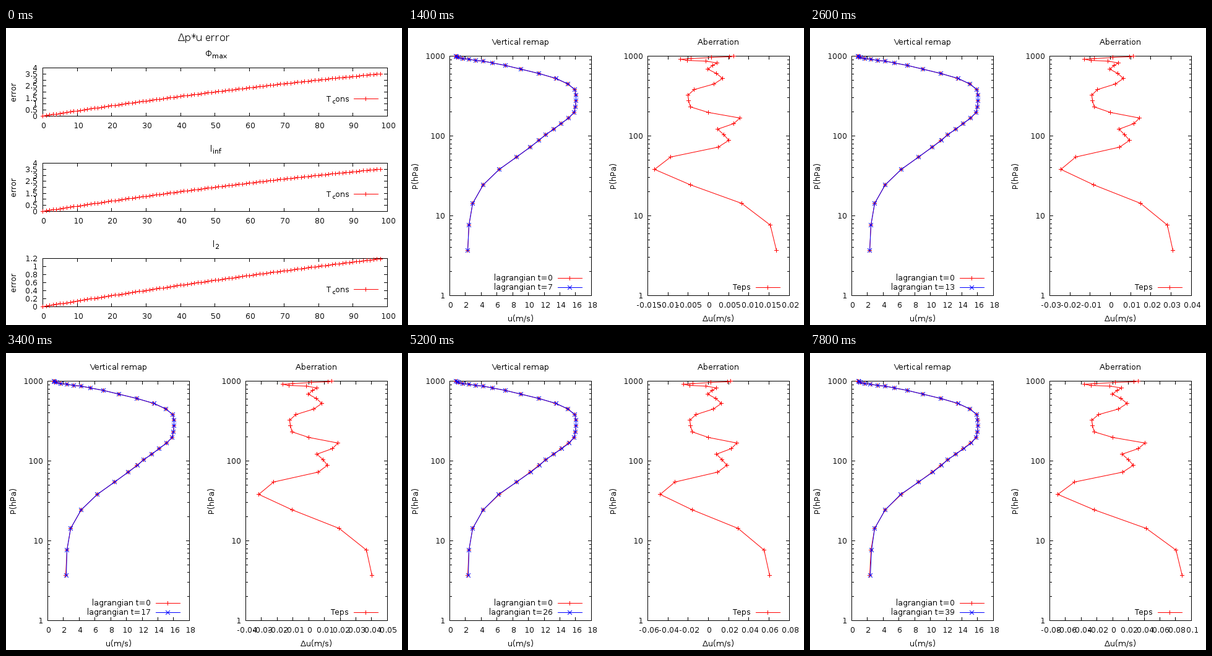
Write a matplotlib script that moves like this. It is 640 by 480 pixels and loops after 8000 ms.

```python
import math

import matplotlib.pyplot as plt
import numpy as np
from matplotlib.animation import FuncAnimation

W, H, DPI = 640, 480, 100
FRAMES, INTERVAL = 40, 200
LEVELS = np.arange(30)
RED, BLUE, BLACK = "#ff0000", "#0000ff", "#000000"
GAP = (np.nan, np.nan)

plt.rcParams.update({
    "font.family": "DejaVu Sans",
    "path.simplify": False,
    "text.hinting": "default",
    "text.hinting_factor": 1,
})


def smooth(x, *keys):
    """Cubic Hermite curve through (x, y) key points."""
    kx, ky = np.array(keys, float).T
    slope = np.gradient(ky, kx)
    i = np.clip(np.searchsorted(kx, x, "right") - 1, 0, len(kx) - 2)
    h = kx[i + 1] - kx[i]
    s = (x - kx[i]) / h
    ease = s * s * (3 - 2 * s)
    bend = s * (1 - s) * ((1 - s) * slope[i] - s * slope[i + 1])
    return ky[i] + (ky[i + 1] - ky[i]) * ease + h * bend


def level_pressure():
    """Log-spaced hybrid levels, summed upwards from the surface."""
    step = np.interp(LEVELS[:-1], [0, 3, 6, 7, 17, 18, 22, 23, 28],
                     [.735, .438, .1985, .1626, .1626, .1503, .046, .0315,
                      .0165])
    height = np.append(np.cumsum(step[::-1])[::-1], 0)
    return 992.6 * np.exp(-height)


PRESSURE = level_pressure()
WIND = smooth(LEVELS, (0, 2.28), (2, 2.9), (3, 4.23), (5, 8.5), (6, 10.25),
              (8, 12.2), (10, 14.17), (12, 15.8), (13, 15.98), (15, 16.02),
              (16, 15.9), (18, 13.48), (20, 9.04), (22, 5.45), (24, 3.33),
              (27, 1.1), (29, 0.8))
# Mean drift per step, in 1e-5 m/s.
RATE = smooth(LEVELS, (0, 233), (1, 212), (2, 113), (4, -185), (5, -129),
              (6, 34), (7, 70), (9, 31), (11, 108), (12, 0), (13, -61),
              (14, -68), (16, -48), (17, 19), (18, 49), (20, -2), (22, 30),
              (25, -96), (26, -60), (28, 72), (29, 86))

fig = plt.figure(figsize=(W / DPI, H / DPI), dpi=DPI, facecolor="white")
ax = fig.add_axes([0, 0, 1, 1])


def stroke(points, color):
    """Draw a one-pixel polyline through pixel centres."""
    xy = np.asarray(points, float) + 0.5
    ax.plot(xy[:, 0], xy[:, 1], color=color, lw=72 / DPI, snap=False,
            solid_joinstyle="miter", solid_capstyle="projecting")


def label(x, y, s, ha="center", px=12.5, rotation=0):
    ax.text(x, y, s, ha=ha, va="baseline", fontsize=px * 72 / DPI,
            rotation=rotation, rotation_mode="anchor", color=BLACK)


def marks(points, color, cross=False):
    segs = []
    for x, y in points:
        if cross:
            segs += [(x - 3, y - 3), (x + 3, y + 3), GAP]
            segs += [(x - 3, y + 3), (x + 3, y - 3), GAP]
        else:
            segs += [(x - 3, y), (x + 3, y), GAP]
            segs += [(x, y - 3), (x, y + 3), GAP]
    stroke(segs, color)


def curve(xs, ys, color, cross=False):
    pts = np.column_stack([np.rint(xs), np.rint(ys)])
    stroke(pts, color)
    marks(pts, color, cross)


def key(x0, x1, y, color, cross=False):
    stroke([(x0, y), (x1, y)], color)
    marks([((x0 + x1) // 2, y)], color, cross)


def frame_box(x0, x1, y0, y1, xt, yt, minor=()):
    """Border with inward ticks on all four sides."""
    segs = [(x0, y0), (x1, y0), (x1, y1), (x0, y1), (x0, y0), GAP]
    for x in np.floor(np.asarray(xt) + 0.4):
        segs += [(x, y1), (x, y1 - 5), GAP, (x, y0), (x, y0 + 5), GAP]
    for ys, n in ((yt, 5), (minor, 3)):
        for y in np.rint(ys):
            segs += [(x0, y), (x0 + n, y), GAP, (x1, y), (x1 - n, y), GAP]
    stroke(segs, BLACK)


def tick_step(span):
    power = 10.0 ** math.floor(math.log10(span))
    count = 20 / (span / power)
    for limit, step in ((40, 0.05), (20, 0.1), (10, 0.2), (4, 0.5), (1, 1)):
        if count > limit:
            return step * power
    return 2 * power


def log_y(p):
    return 45 + (3 - np.log10(p)) * 129


def drift(t):
    """Error after t steps; growth slows slightly with time."""
    return RATE * 1e-5 * t * (1 + 0.002 * (23 - t))


def profile_panel(x0, x1, ticks, title, xlabel, ylabel_x):
    """Log-pressure panel; returns its value-to-pixel map."""
    lo, hi = ticks[0], ticks[-1]

    def to_x(v):
        return x0 + (np.asarray(v) - lo) / (hi - lo) * (x1 - x0)

    decades = [1, 10, 100, 1000]
    minor = [log_y(m * d) for d in decades[:3] for m in range(2, 10)]
    frame_box(x0, x1, 45, 432, to_x(ticks), log_y(decades), minor)
    for d in decades:
        label(x0 - 7, round(log_y(d)) + 5, str(d), "right")
    for v in ticks:
        label(to_x(v) + 2, 452, f"{v:g}")
    mid = (x0 + x1) / 2 + 0.5
    label(mid, 27, title)
    label(mid, 474, xlabel)
    label(ylabel_x, 238, "P(hPa)", rotation=90)
    return to_x


def draw_profiles(t):
    err = drift(t)
    ys = log_y(PRESSURE)

    to_x = profile_panel(67, 296, np.arange(0, 19, 2), "Vertical remap",
                         "u(m/s)", 16)
    curve(to_x(WIND), ys, RED)
    curve(to_x(WIND + err), ys, BLUE, cross=True)
    label(234, 408, "lagrangian t=0", "right")
    label(234, 423, f"lagrangian t={t}", "right")
    key(242, 281, 404, RED)
    key(242, 281, 419, BLUE, cross=True)

    step = tick_step(np.ptp(err))
    first, last = math.floor(err.min() / step), math.ceil(err.max() / step)
    ticks = np.arange(first, last + 1) * step
    to_x = profile_panel(387, 616, ticks, "Aberration", "Δu(m/s)", 336)
    curve(to_x(err), ys, RED)
    label(554, 423, "Teps", "right")
    key(562, 601, 419, RED)


def error_panel(y0, ticks, a, b):
    y1, x0, x1 = y0 + 78, 59, 616
    xt = np.arange(0, 101, 10)

    def to_x(v):
        return x0 + v * (x1 - x0) / 100

    def to_y(v):
        return y1 - v * (y1 - y0) / ticks[-1]

    frame_box(x0, x1, y0, y1, to_x(xt), to_y(ticks))
    for v in ticks:
        label(51, round(to_y(v)) + 5, f"{v:g}", "right")
    for v in xt:
        label(to_x(v) + 2, y1 + 20, str(v))
    label(16, y0 + 39, "error", rotation=90)

    t = np.arange(99)
    curve(to_x(t), to_y(a * t - b * t ** 2), RED)
    label(518.5, y0 + 55, "T", "left")
    label(526.5, y0 + 58, "c", "left", 10)
    label(532, y0 + 55, "ons", "left")
    key(562, 601, y0 + 50, RED)


def draw_errors():
    label(320.5, 21, "Δp*u error", px=16)
    titles = (("Φ", "max", 322, 333), ("l", "inf", 330, 334),
              ("l", "2", 334, 338))
    halves, fifths = np.arange(9) * 0.5, np.arange(7) * 0.2
    shapes = ((halves, 0.04446, 8.93e-5), (halves, 0.04446, 8.93e-5),
              (fifths, 0.01406, 1.95e-5))
    for i, (main, sub, xm, xs) in enumerate(titles):
        y0 = 64 + 154 * i
        label(xm, y0 - 18, main, "left", 14)
        label(xs, y0 - 15, sub, "left", 11.2)
        error_panel(y0, *shapes[i])


def draw(k):
    ax.clear()
    ax.set_xlim(0, W)
    ax.set_ylim(H, 0)
    ax.axis("off")
    if k == 0:
        draw_errors()
    else:
        draw_profiles(k)
    return ax.get_children()


anim = FuncAnimation(fig, draw, frames=FRAMES, interval=INTERVAL,
                     init_func=lambda: [], repeat=True, repeat_delay=0)
plt.show()
```
